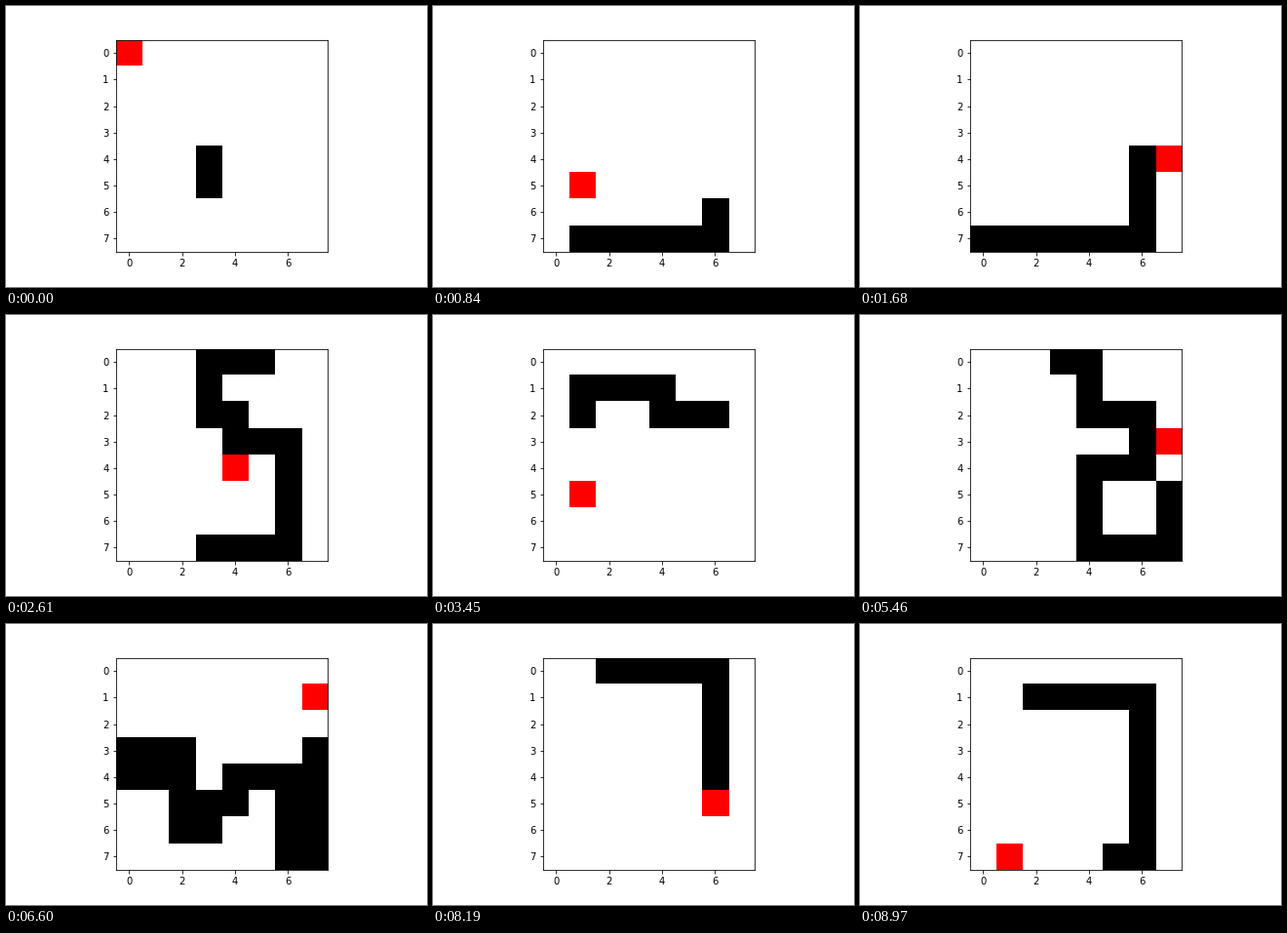
Recreate the animation shown at these times as a matplotlib script. Size 432 by 288 pixels, loop 9 s.

```python
import numpy as np
import matplotlib.pyplot as plt
from matplotlib.animation import FuncAnimation

plt.rcParams["font.family"] = "DejaVu Sans"
plt.rcParams["font.size"] = 10

SIZE = 8
INTERVAL = 30
START = [(3, 5), (3, 4)]
STEP = {"L": (-1, 0), "R": (1, 0), "U": (0, -1), "D": (0, 1)}
WHITE, BLACK, RED = (255, 255, 255), (0, 0, 0), (255, 0, 0)

# Each round: the snake's turns, then the food cells (x, y) in order.
ROUNDS = [
    ("L3 U5 R2 D3 R3 U1 R1 D5 L5 U5 R3 U1 L4 D6 R6 U3 R1 U4 L4 D7 "
     "R3 U4 L2 U1 L1 U2 R2 D2",
     [(0, 0), (2, 3), (5, 2), (6, 6), (3, 7), (1, 5), (4, 1), (0, 6),
      (7, 4), (5, 0), (3, 4), (5, 7), (4, 3), (3, 0), (4, 4)]),
    ("L3 D2 R5 U1 R2 U4 L3 U1 L3 D4 R4 U3 L5 D1 R1 D1 R6 U1 L5 U3 "
     "L1 D7 R2 U7 R1 D2 R2 D2 L2 D3 R3 U6 L7 D1 R3 D1 L3 D1 R2 D2 "
     "R1 U1 R1 U1 R2 D3 R1 U6 L2 D2",
     [(0, 5), (2, 7), (5, 6), (7, 4), (4, 2), (2, 1), (1, 5), (5, 5),
      (0, 3), (7, 3), (2, 0), (1, 7), (3, 0), (6, 2), (4, 4), (6, 7),
      (7, 3), (3, 1), (0, 4), (6, 7), (7, 1), (5, 6)]),
    ("L2 U5 R5 D6 L6 U3 R4 U2 L3 U1 R5 D6 L6 U5 R6 D6 L1",
     [(1, 2), (5, 0), (6, 4), (2, 6), (0, 3), (3, 3), (2, 0), (6, 5),
      (3, 6), (4, 1), (1, 7)]),
]


def play(turns, foods):
    """Yield (snake, food) for every step of one round."""
    snake, foods = list(START), list(foods)
    yield list(snake), foods[0]
    for turn in turns.split():
        dx, dy = STEP[turn[0]]
        for _ in range(int(turn[1:])):
            head = (snake[0][0] + dx, snake[0][1] + dy)
            snake.insert(0, head)
            if head == foods[0]:
                foods.pop(0)
            else:
                snake.pop()
            yield list(snake), foods[0]


def board(snake, food):
    grid = np.full((SIZE, SIZE, 3), WHITE, dtype=np.uint8)
    for x, y in snake:
        grid[y, x] = BLACK
    grid[food[1], food[0]] = RED
    return grid


states = [state for game in ROUNDS for state in play(*game)]

fig, ax = plt.subplots(figsize=(6, 4), dpi=72, facecolor="white")
fig.subplots_adjust(left=0.125, right=0.9, bottom=0.125, top=0.88)
image = ax.imshow(board(*states[0]), interpolation="nearest")
ax.set_xticks(range(0, SIZE, 2))
ax.set_yticks(range(SIZE))


def update(i):
    image.set_data(board(*states[i]))
    return (image,)


anim = FuncAnimation(fig, update, frames=len(states), interval=INTERVAL,
                     repeat=True, repeat_delay=0)
plt.show()
```
